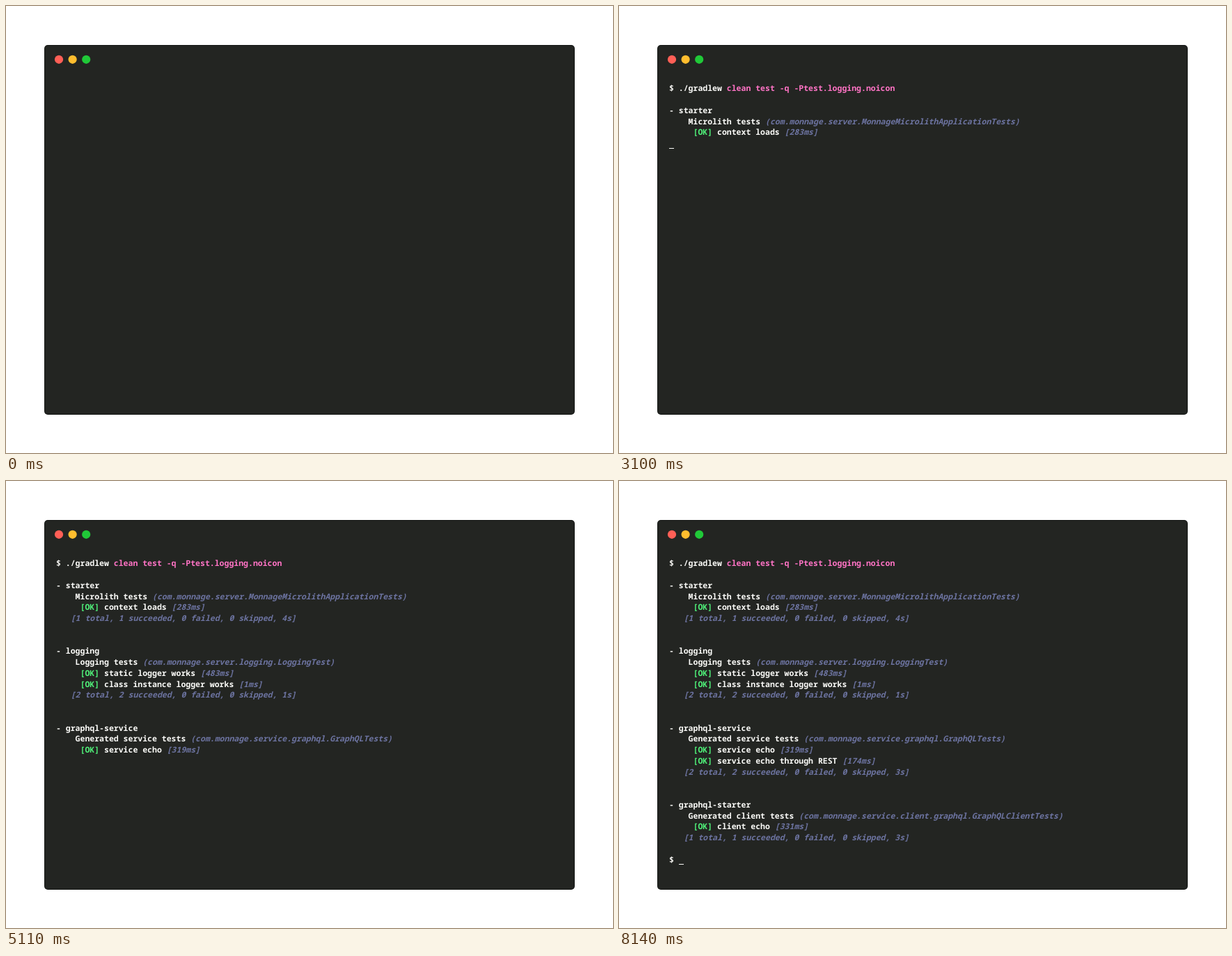
Recreate the animation shown at these times as an HTML page with a canvas. Size 872x642 px, loop 8.17 s.

```html
<!DOCTYPE html>
<html lang="en">
<head>
<meta charset="utf-8">
<title>Terminal test run</title>
<style>
  html, body { margin: 0; width: 100%; height: 100%; overflow: hidden; background: #fff; }
  canvas { display: block; }
</style>
</head>
<body>
<canvas id="stage" width="872" height="642"></canvas>
<script>
const ctx = document.getElementById('stage').getContext('2d');

const LOOP = 8170;
const LEFT = 72;
const CELL = 6.9;
const ROW = 15.75;
const BASELINE = 122.4;
const CURSOR_TOP = 125.3;
const BLINK = 150;
const FONT = 'bold 11.5px "Noto Sans Mono", "Liberation Mono", monospace';

const white = text => ({ text, color: '#fbfbf8' });
const pink = text => ({ text, color: '#ff73c5' });
const green = text => ({ text, color: '#50f37a' });
const dim = text => ({ text, color: '#6c73a0', italic: true });

const module = name => [white(`\n- ${name}\n`)];
const suite = (title, path) => [white(`    ${title} `), dim(`(com.monnage.${path})\n`)];
const passed = (title, time) =>
  [white('     '), green('[OK]'), white(` ${title} `), dim(`[${time}]\n`)];
const summary = (count, time) =>
  [dim(`   [${count} total, ${count} succeeded, 0 failed, 0 skipped, ${time}]\n\n`)];

// Each entry: time in ms, then the runs written to the terminal at that time.
const output = [
  [100, white('$ ')],
  [430, white('./gradlew '), pink('clean test -q -Ptest.logging.noicon')],
  [730, white('\n')],
  [1930, ...module('starter')],
  [1990, ...suite('Microlith tests', 'server.MonnageMicrolithApplicationTests')],
  [3100, ...passed('context loads', '283ms')],
  [3130, ...summary(1, '4s')],
  [3340, ...module('logging')],
  [3400, ...suite('Logging tests', 'server.logging.LoggingTest')],
  [3640, ...passed('static logger works', '483ms'), ...passed('class instance logger works', '1ms')],
  [3670, ...summary(2, '1s')],
  [4120, ...module('graphql-service')],
  [4180, ...suite('Generated service tests', 'service.graphql.GraphQLTests')],
  [5110, ...passed('service echo', '319ms')],
  [5140, ...passed('service echo through REST', '174ms')],
  [5170, ...summary(2, '3s')],
  [5320, ...module('graphql-starter')],
  [5380, ...suite('Generated client tests', 'service.client.graphql.GraphQLClientTests')],
  [6490, ...passed('client echo', '331ms')],
  [6520, ...summary(1, '3s')],
  [6910, white('$ ')]
];

function drawWindow() {
  ctx.fillStyle = '#fff';
  ctx.fillRect(0, 0, 872, 642);
  ctx.beginPath();
  ctx.roundRect(55, 56, 762, 531, 5);
  ctx.fillStyle = '#111311';
  ctx.fill();
  ctx.beginPath();
  ctx.roundRect(56, 57, 760, 529, 4);
  ctx.fillStyle = '#232522';
  ctx.fill();
  ['#ff5f56', '#ffbd2e', '#20c938'].forEach((color, i) => {
    ctx.beginPath();
    ctx.arc(76 + 19.6 * i, 76.8, 6.1, 0, 2 * Math.PI);
    ctx.fillStyle = color;
    ctx.fill();
  });
}

// Writes everything printed up to time t and returns the cursor cell.
function drawOutput(t) {
  let row = 0, col = 0;
  for (const [time, ...runs] of output) {
    if (time > t) break;
    for (const { text, color, italic } of runs) {
      ctx.font = (italic ? 'italic ' : '') + FONT;
      ctx.fillStyle = color;
      text.split('\n').forEach((part, i) => {
        if (i) { row++; col = 0; }
        if (part) ctx.fillText(part, LEFT + col * CELL, Math.round(BASELINE + row * ROW));
        col += part.length;
      });
    }
  }
  return { row, col };
}

function cursorVisible(t) {
  if (t < 100) return false;
  if (t >= 8140) return true;
  const phase = t - (t < 5350 ? 100 : 130);
  return Math.floor(phase / BLINK) % 2 === 0;
}

function draw(t) {
  drawWindow();
  const { row, col } = drawOutput(t);
  if (cursorVisible(t)) {
    ctx.fillStyle = '#fbfbf8';
    ctx.fillRect(Math.round(LEFT + col * CELL), Math.floor(CURSOR_TOP + row * ROW), 7, 1);
  }
}

ctx.textRendering = 'geometricPrecision';
const start = performance.now();
function tick() {
  draw((performance.now() - start) % LOOP);
  requestAnimationFrame(tick);
}
tick();
</script>
</body>
</html>
```
